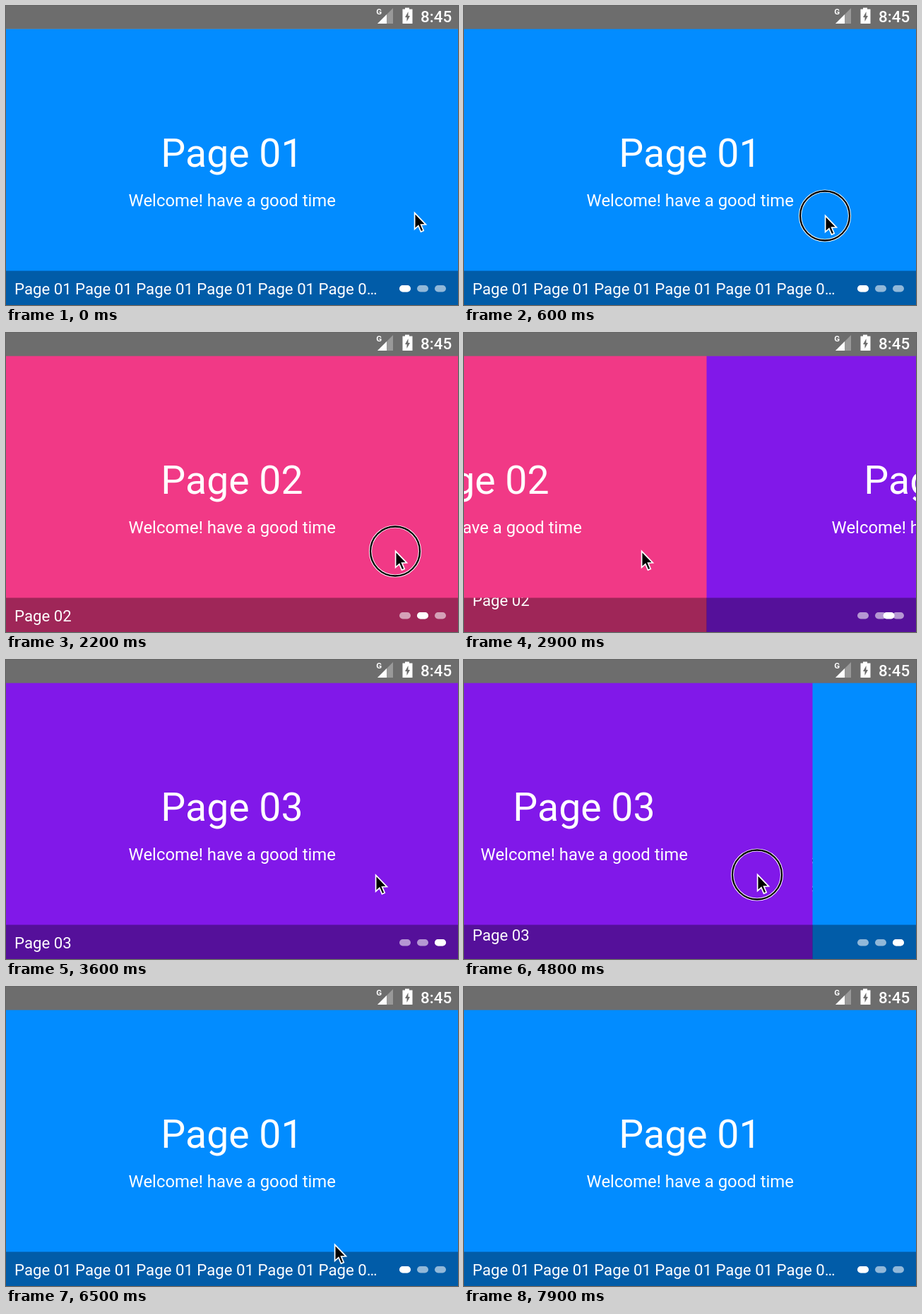
Write an HTML page with a canvas that moves like this. It is 640x424 px and loops after 8000 ms.

```html
<!DOCTYPE html>
<html>
<head>
<meta charset="utf-8">
<style>
html, body { margin: 0; width: 100%; height: 100%; overflow: hidden; }
canvas { display: block; }
</style>
</head>
<body>
<canvas id="stage" width="640" height="424"></canvas>
<script>
const ctx = document.getElementById('stage').getContext('2d');
const W = 640, H = 424, TOP = 32.5, BAR = 375.5, LOOP = 8000, STEP = 100;
const MARGIN = 3.5, PAGE = W + 2 * MARGIN;
const HOLD = 100, DRAG = 600, SPEED = 0.5, SETTLE = 600;
const colors = ['#028cff', '#f13986', '#8118e9'];
const captions = ['Page 01 '.repeat(5) + 'Page 0…', 'Page 02', 'Page 03'];

// Each swipe: press, hold, drag left at constant speed, release
const begin = { x: 578, y: 293 };
const swipes = [
  { at: 600, x: 511, y: 297 },
  { at: 2200, x: 551, y: 309 },
  { at: 4400, x: 565, y: 304 }
];
const leave = { at: 6500, x: 465, y: 365 };

const clamp = v => Math.min(1, Math.max(0, v));
const easeOut = (v, power) => 1 - (1 - clamp(v)) ** power;
const release = s => s.at + HOLD + DRAG;
const pull = (s, t) => SPEED * DRAG * clamp((t - s.at - HOLD) / DRAG);

function pointer(t) {
  if (t >= leave.at) return { x: leave.x + SPEED * (t - leave.at), y: leave.y };
  const last = swipes.findLast(s => t >= s.at);
  const next = swipes.find(s => t < s.at) || leave;
  const from = last ? { x: last.x - pull(last, t), y: last.y } : begin;
  const t0 = last ? release(last) : 0;
  const p = easeOut((t - t0) / (next.at - t0), 3.2);
  return { x: from.x + (next.x - from.x) * p, y: from.y + (next.y - from.y) * p };
}

function offset(s, t) {
  const moved = pull(s, t);
  return Math.round(moved + (PAGE - moved) * easeOut((t - release(s)) / SETTLE, 5));
}

function rect(x, y, w, h, fill) {
  ctx.fillStyle = fill;
  ctx.fillRect(x, y, w, h);
}

function text(str, x, y, size, align = 'left', weight = 400) {
  ctx.font = `${weight} ${size}px Roboto, sans-serif`;
  ctx.textAlign = align;
  ctx.fillStyle = '#fff';
  ctx.fillText(str, x, y);
}

function poly(points, fill) {
  ctx.beginPath();
  points.forEach(([x, y]) => ctx.lineTo(x, y));
  ctx.closePath();
  ctx.fillStyle = fill;
  ctx.fill();
}

function pill(x, fill) {
  ctx.beginPath();
  ctx.roundRect(x - 8, 396, 16, 9.5, 4.75);
  ctx.fillStyle = fill;
  ctx.fill();
}

function ring(color, width) {
  ctx.beginPath();
  ctx.arc(0, 0.5, 35, 0, 2 * Math.PI);
  ctx.strokeStyle = color;
  ctx.lineWidth = width;
  ctx.stroke();
}

function drawPage(i, x) {
  rect(x - MARGIN, TOP, PAGE, H - TOP, colors[i]);
  text('Page 0' + (i + 1), x + 320, 228, 55.4, 'center');
  text('Welcome! have a good time', x + 320.3, 284, 23.9, 'center');
}

function drawStatus() {
  rect(0, 0, W, TOP, '#6d6d6d');
  text('G', 524.3, 12, 11.5, 'left', 700);
  poly([[526, 25], [548, 25], [548, 3]], 'rgba(255,255,255,.3)');
  poly([[526, 25], [539, 25], [539, 12]], '#fff');
  rect(565, 2.5, 6, 3, '#fff');
  rect(561.5, 4.5, 14, 20.5, '#fff');
  poly([[569.5, 8], [565, 16], [567.5, 16], [567.5, 22], [572, 14], [569.5, 14]], '#6d6d6d');
  text('8:45', 587, 23, 22.4, 'left', 500);
}

// The caption of the nearer page rides up with the scroll
function drawBar(page, p) {
  rect(0, BAR, W, H - BAR, 'rgba(0,0,0,.34)');
  ctx.save();
  ctx.beginPath();
  ctx.rect(0, BAR, W, H - BAR);
  ctx.clip();
  const near = Math.round(p);
  text(captions[(page + near) % 3], 12, 409.3 + 48 * (near - p), 22.2);
  ctx.restore();
  for (let i = 0; i < 3; i++) pill(565 + 25 * i, 'rgba(255,255,255,.57)');
  pill(565 + 25 * Math.min(2, page + p), '#fff');
}

function drawPointer({ x, y }, pressed) {
  ctx.save();
  ctx.translate(x, y);
  if (pressed) {
    ring('#fff', 4.2);
    ring('#000', 2.3);
  }
  ctx.translate(0.6, 0.4);
  poly([[0, 0], [0, 23], [5.3, 18.2], [8.9, 26.7], [12.6, 25.1], [9, 16.7], [15.8, 16.4]], '#000');
  ctx.strokeStyle = '#fff';
  ctx.lineWidth = 1.7;
  ctx.stroke();
  ctx.restore();
}

function draw(now) {
  const t = Math.floor(now % LOOP / STEP) * STEP;
  const scroll = swipes.reduce((sum, s) => sum + offset(s, t), 0);
  const page = Math.floor(scroll / PAGE) % 3, x = scroll % PAGE;
  drawPage(page, -x);
  if (x) drawPage((page + 1) % 3, PAGE - x);
  drawBar(page, x / PAGE);
  drawStatus();
  drawPointer(pointer(t), swipes.some(s => t >= s.at && t < release(s)));
  requestAnimationFrame(time => draw(Math.max(0, time - start)));
}

const start = performance.now();
draw(0);
</script>
</body>
</html>
```
